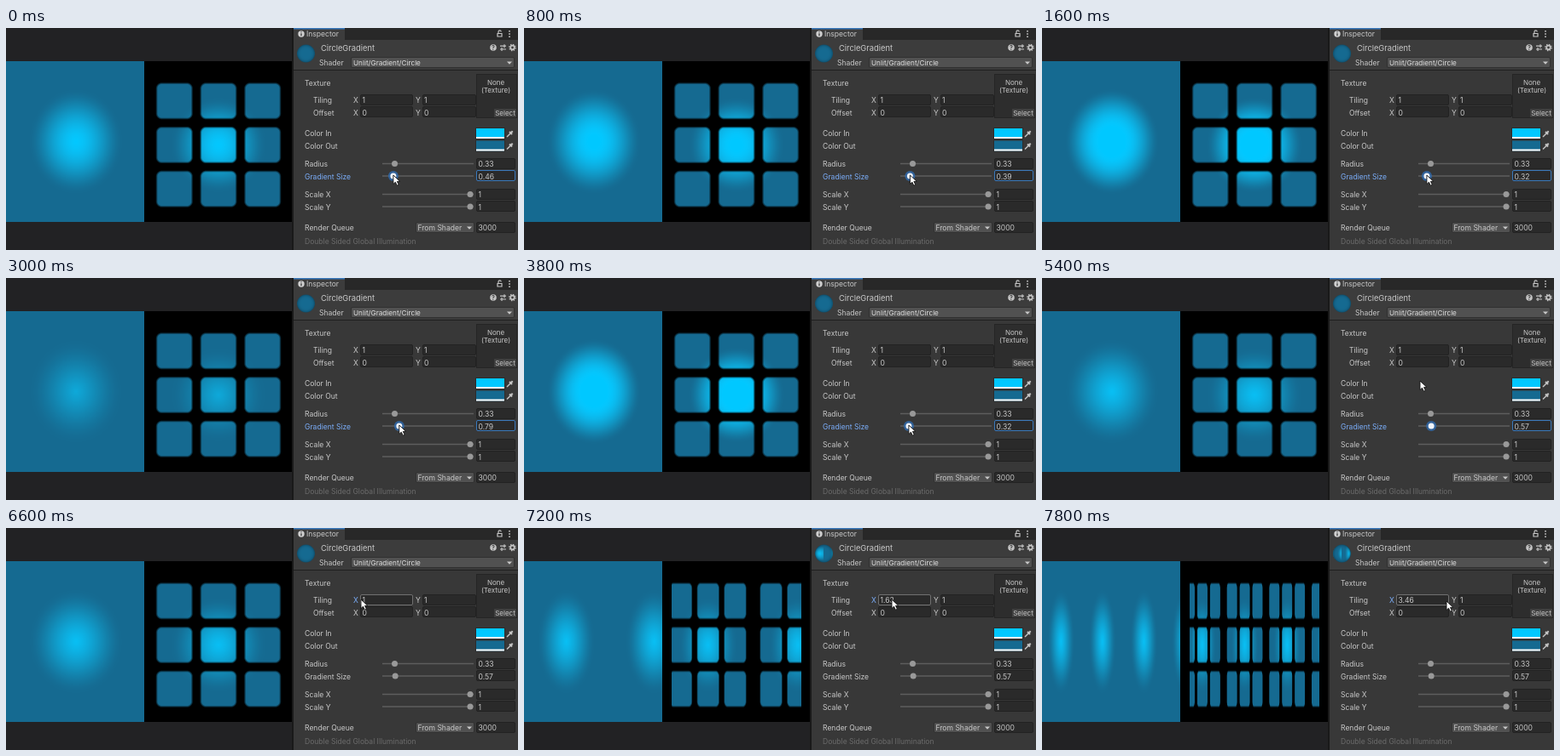
These frames come from a looping animation (600 by 261 pixels, 8000 ms). An HTML page with a canvas:

```html
<!DOCTYPE html>
<html lang="en">
<head>
<meta charset="utf-8">
<style>
  html, body { margin: 0; width: 100%; height: 100%; overflow: hidden; background: #222224; }
  svg, canvas { position: absolute; left: 0; top: 0; width: 600px; height: 261px; }
  text { font: 8.55px Inter, sans-serif; fill: #c8c8c8; }
  .small { font-size: 8px; }
  .field { fill: #2a2a2a; stroke: #222; }
  .drop { fill: #515151; stroke: #303030; }
  .knob { fill: #999; }
  .icon { fill: none; stroke: #c4c4c4; stroke-width: 1.2; }
  .arrow { fill: #c8c8c8; }
</style>
</head>
<body>
<svg viewBox="0 0 600 261">
  <rect x="335" width="2" height="261" fill="#191919"/>
  <rect x="337" width="263" height="261" fill="#383838"/>
  <rect x="337" width="263" height="14" fill="#282828"/>
  <rect x="337" width="60" height="14" fill="#3c3c3c"/>
  <rect x="337" width="60" height="1.5" fill="#3a79bb"/>
  <rect x="337" y="14" width="263" height="35" fill="#3c3c3c"/>
  <rect x="337" y="49" width="263" height="1" fill="#1f1f1f"/>

  <circle cx="346" cy="7" r="3.7" fill="#d0d0d0"/>
  <path d="M346 6.3v3M346 4.3v1" stroke="#333" stroke-width="1.2"/>
  <path class="icon" d="M576 6.5h5v3.5h-5zM577 6.5v-2a1.6 1.6 0 0 1 3.2 0"/>
  <path d="M590 3v8" stroke="#c4c4c4" stroke-width="1.7" stroke-dasharray="1.6 1.6"/>
  <circle cx="571" cy="23" r="3.8" fill="#c4c4c4"/>
  <text x="571" y="25.7" text-anchor="middle" style="font-size:7px;font-weight:700;fill:#3c3c3c">?</text>
  <path class="icon" d="M579 21.2h7M579 25h7M584 19.2v4M581 23v4"/>
  <circle cx="593.5" cy="23" r="2.3" class="icon" style="stroke-width:1.7"/>
  <circle cx="593.5" cy="23" r="3.7" class="icon" style="stroke-dasharray:1.45 1.45"/>

  <rect class="drop" x="404.5" y="34.5" width="191" height="12" rx="1.5"/>
  <path class="arrow" d="M587 39.5h6l-3 3.3z"/>

  <rect x="551.5" y="54.5" width="47" height="51" fill="#2d2d2d" stroke="#252525"/>
  <rect x="572" y="95" width="26" height="10" fill="#404040"/>

  <g id="fields"></g>
  <g id="swatches"></g>
  <g id="sliders"></g>
  <rect class="drop" x="480.5" y="228.5" width="68" height="12" rx="1.5"/>
  <path class="arrow" d="M540 233.5h6l-3 3.3z"/>
  <g id="labels"></g>

  <path id="cursor" d="M0 0v10.5l2.5-2.3 1.9 4 2-.9-1.9-3.9h3.4z" fill="#fff" stroke="#111" stroke-width=".9"/>
</svg>
<canvas width="600" height="261"></canvas>

<script>
const LOOP = 8000, STEP = 200;
const $ = id => document.getElementById(id);
const add = (group, markup) => $(group).insertAdjacentHTML('beforeend', markup);
const clamp = (v, lo = 0, hi = 1) => Math.min(hi, Math.max(lo, v));
const smooth = v => v * v * (3 - 2 * v);

// ---- Inspector ----
const field = (id, x, baseline, w) => add('fields',
  `<rect class="field" id="${id}" x="${x + .5}" y="${Math.round(baseline - 10.5) + .5}" width="${w}" height="12" rx="1.5"/>`);
const label = (x, y, text, attrs = '') => add('labels', `<text x="${x}" y="${y}" ${attrs}>${text}</text>`);

label(352, 10, 'Inspector');
label(369, 27, 'CircleGradient', 'style="font-size:9.3px"');
label(367, 44, 'Shader');
label(407, 44, 'Unlit/Gradient/Circle', 'style="font-size:8.2px;fill:#e0e0e0"');
label(350, 68, 'Texture');
label(574, 67, 'None', 'class="small" text-anchor="middle"');
label(574, 75.5, '(Texture)', 'class="small" text-anchor="middle"');
label(585, 102.5, 'Select', 'class="small" text-anchor="middle"');

[['Tiling', 88, 1], ['Offset', 102.5, 0]].forEach(([name, y, value]) => {
  field(name + 'X', 415, y, 61);
  field(name + 'Y', 488, y, 62);
  label(360, y, name);
  label(407, y, 'X', `id="${name}XLabel"`);
  label(480, y, 'Y');
  label(417.5, y, value, `id="${name}XValue"`);
  label(490, y, value);
});

[['Color In', 127, '#00c8ff'], ['Color Out', 141.5, '#156a91']].forEach(([name, y, color]) => {
  label(350, y, name);
  add('swatches', `<rect x="550.5" y="${y - 9.5}" width="34" height="13" fill="${color}" stroke="#2c2c2c"/>
    <rect x="551" y="${y + 1}" width="33" height="2" fill="#fff"/>
    <path d="M587 ${y + 1}l4.5-4.5" stroke="#c4c4c4" stroke-width="1.5"/>
    <path d="M590 ${y - 5}l3 3M591.5 ${y - 3.5}l2.2-2.2" stroke="#c4c4c4" stroke-width="2"/>`);
});

[['Radius', 163, 455.5, '0.33', 'radius'], ['Gradient Size', 177.5, 453.5, '', 'size'],
 ['Scale X', 199, 544, '1', 'scaleX'], ['Scale Y', 213.5, 544, '1', 'scaleY']].forEach(([name, y, x, value, id]) => {
  field(id + 'Field', 551, y, 45);
  label(350, y, name, `id="${id}Label"`);
  label(553.5, y, value, `id="${id}Value"`);
  add('sliders', `<path d="M441 ${y - 3.5}h107" stroke="#5e5e5e" stroke-width="1.4"/>
    <g id="${id}Knob" transform="translate(${x} ${y - 3.5})">
      <circle class="halo" r="6" fill="#2f6bb0" opacity="0"/><circle class="knob" r="3.5"/></g>`);
});

field('queueField', 551, 238, 45);
label(350, 237.5, 'Render Queue');
label(482.5, 237.5, 'From Shader');
label(553.5, 237.5, '3000');
label(350, 253.5, 'Double Sided Global Illumination', 'style="fill:#6b6b6b"');

// ---- Circle shader, blended in linear light ----
const SPLIT = 162;
const toLinear = c => (c / 255) ** 2.2;
const toDisplay = c => 255 * c ** (1 / 2.2);
const inner = [0, 200, 255].map(toLinear), outer = [21, 106, 145].map(toLinear);
const palette = Array.from({ length: 256 }, (_, i) =>
  outer.map((c, k) => toDisplay(c + (inner[k] - c) * i / 255)));
const fract = v => v - Math.floor(v);

function circleColor(u, v, size) {
  const distance = Math.hypot(u - .5, v - .5);
  return palette[Math.round(255 * smooth(clamp((.33 - distance) / (.75 * size))))];
}

// Coverage of the 3 x 3 grid of rounded cells, measured in pixels from its centre.
function cellCoverage(x, y) {
  const pitch = 51.7, half = 20.7, corner = 6;
  const fold = d => Math.abs(d - pitch * clamp(Math.round(d / pitch), -1, 1)) - half + corner;
  const dx = fold(x), dy = fold(y);
  const edge = Math.hypot(Math.max(dx, 0), Math.max(dy, 0)) + Math.min(Math.max(dx, dy), 0) - corner;
  return clamp(.5 - edge / 2.6);
}

const ctx = document.querySelector('canvas').getContext('2d');
const image = ctx.createImageData(600, 261);

function paint(x, y, color, light = 1, alpha = 1) {
  const i = (y * 600 + x) * 4;
  for (let k = 0; k < 3; k++) image.data[i + k] = color[k] * light;
  image.data[i + 3] = 255 * alpha;
}

function drawShader(size, tiling) {
  for (let y = 39; y < 228; y++) {
    for (let x = 0; x < SPLIT; x++)
      paint(x, y, circleColor(fract((x + 2.5) / 168 * tiling), (y - 38.5) / 189, size));
    for (let x = SPLIT; x < 335; x++) {
      const u = fract((x - 162.5) / 172 * tiling), dy = y + .5 - 137.5;
      const light = x < 173 || x >= 325 ? 0 : cellCoverage((u - .5) * 172, dy);
      paint(x, y, circleColor(u, .5 + dy / 172, size), light);
    }
  }
  // Preview sphere, with the texture seam facing the viewer.
  const cx = 351.5, cy = 30, radius = 10.5;
  for (let y = 19; y < 42; y++) for (let x = 340; x < 363; x++) {
    const dx = (x + .5 - cx) / radius, dy = (y + .5 - cy) / radius, r = Math.hypot(dx, dy);
    const u = fract(Math.asin(clamp(dx / Math.sqrt(Math.max(.01, 1 - dy * dy)), -1, 1)) / (2 * Math.PI));
    const v = .5 + Math.asin(clamp(dy, -1, 1)) / Math.PI;
    paint(x, y, circleColor(fract(u * tiling), v, size), 1 - .3 * clamp(r) ** 6, clamp((1 - r) * radius + .5));
  }
  ctx.putImageData(image, 0, 0);
}

// ---- Motion: [time, value] or [time, x, y] ----
const sizeKeys = [[0, .46], [1600, .32], [3000, .79], [3800, .32], [4800, .57]];
const pointerKeys = [[4800, 456, 173], [5400, 443, 121], [6200, 410, 84], [6600, 416, 84], [7200, 431, 84], [7800, 474, 86]];

function sample(keys, t, channel = 1) {
  const next = keys.findIndex(key => key[0] > t);
  if (next < 0) return keys.at(-1)[channel];
  if (next === 0) return keys[0][channel];
  const a = keys[next - 1], b = keys[next];
  return a[channel] + (b[channel] - a[channel]) * smooth((t - a[0]) / (b[0] - a[0]));
}

function render(t) {
  const size = sample(sizeKeys, t), knobX = 444.2 + 21 * size;
  const dragging = t <= 4800, tilingFocus = t >= 6400;
  const px = dragging ? knobX : sample(pointerKeys, t), py = dragging ? 173 : sample(pointerKeys, t, 2);
  const tiling = tilingFocus ? Math.max(1, 1 + (px - 416.2) * .04256) : 1;

  $('cursor').setAttribute('transform', `translate(${px} ${py})`);
  $('sizeKnob').setAttribute('transform', `translate(${knobX} 174)`);
  $('sizeKnob').querySelector('.halo').style.opacity = tilingFocus ? 0 : .8;
  $('sizeKnob').querySelector('.knob').style.fill = tilingFocus ? '#999' : '#f0f4fa';
  $('sizeLabel').style.fill = tilingFocus ? '' : '#7baefa';
  $('sizeField').style.stroke = tilingFocus ? '' : '#3a79bb';
  $('sizeValue').textContent = size.toFixed(2);
  $('TilingXLabel').style.fill = tilingFocus ? '#7baefa' : '';
  $('TilingX').style.stroke = tilingFocus ? '#707070' : '';
  $('TilingXValue').textContent = +tiling.toFixed(2);
  drawShader(size, tiling);
}

let shown = -1;
function tick() {
  const step = Math.floor(performance.now() % LOOP / STEP);
  if (step !== shown) render((shown = step) * STEP);
  requestAnimationFrame(tick);
}
tick();
</script>
</body>
</html>
```
